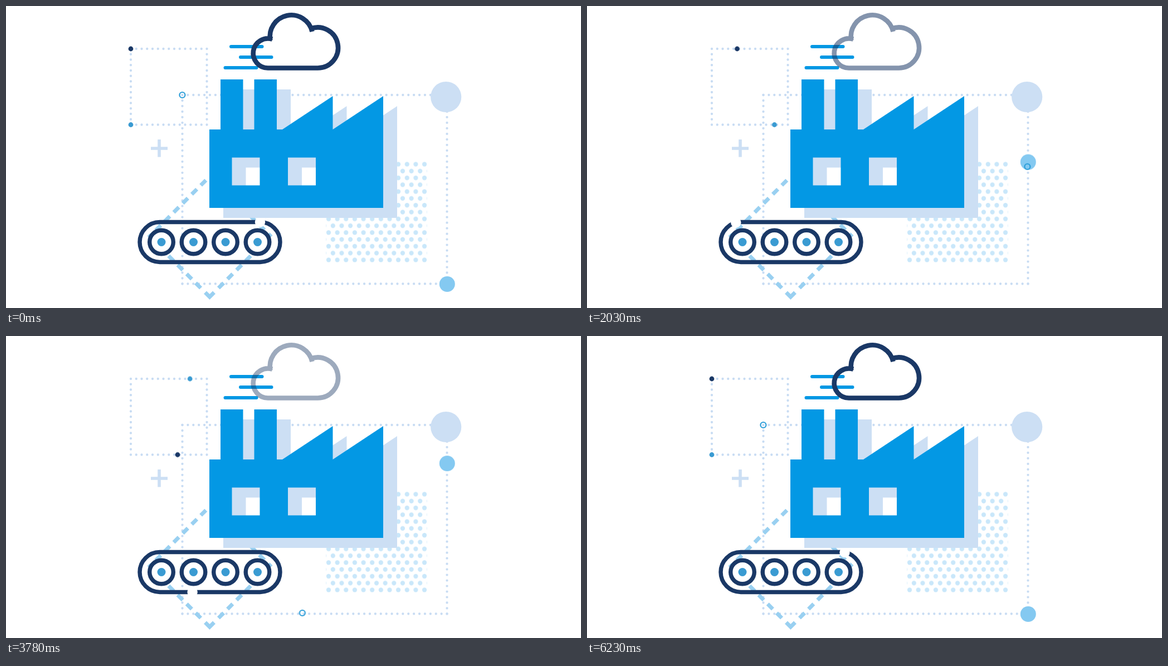
Write an HTML page that moves like this. It is 1032 px wide and 543 px high and loops after 6300 ms.

```html
<!DOCTYPE html>
<html lang="en">
<head>
<meta charset="utf-8">
<title>Factory</title>
<style>
  html, body { margin: 0; width: 100%; height: 100%; overflow: hidden; background: #fff; }
  svg { display: block; width: 100%; height: 100%; }

  .dotted { fill: none; stroke: #c8dcf3; stroke-width: 4.3; stroke-linecap: round; }
  .dashes { fill: none; stroke: #99d0f1; stroke-width: 7; }
  .navy { fill: none; stroke: #1a3866; }
  .pale { fill: #ccdff4; }
  .blue { fill: #0398e4; }
  .hub { fill: #3a9bd2; }

  /* The picture advances every 70 ms: 90 steps per loop. */
  .move { animation: 6300ms -1ms infinite steps(90); }
  .ring { animation-name: ring; }
  .dark { animation-name: dark; }
  .light { animation-name: light; }
  .lift { animation-name: lift; }
  .cloud { animation-name: fade; }
  .gap { animation-name: gap; }

  @keyframes ring {
    0% { transform: translate(0, 0); animation-timing-function: steps(21); }
    23.3333% { transform: translate(474px, 0); animation-timing-function: steps(21); }
    46.6667% { transform: translate(474px, 338px); animation-timing-function: steps(22); }
    71.1111% { transform: translate(0, 338px); animation-timing-function: steps(21); }
    94.4444%, 100% { transform: translate(0, 0); }
  }
  @keyframes dark {
    0%, 27.7778% { transform: translate(0, 0); animation-timing-function: steps(12); }
    41.1111% { transform: translate(136.5px, 0); animation-timing-function: steps(12); }
    54.4444% { transform: translate(136.5px, 136.5px); animation-timing-function: steps(13); }
    68.8889% { transform: translate(0, 136.5px); animation-timing-function: steps(13); }
    83.3333%, 100% { transform: translate(0, 0); }
  }
  @keyframes light {
    0%, 16.6667% { transform: translate(0, 0); animation-timing-function: steps(17); }
    35.5556% { transform: translate(136.5px, 0); animation-timing-function: steps(18); }
    55.5556% { transform: translate(136.5px, -136.5px); animation-timing-function: steps(18); }
    75.5556% { transform: translate(0, -136.5px); animation-timing-function: steps(17); }
    94.4444%, 100% { transform: translate(0, 0); }
  }
  @keyframes lift {
    0% { transform: translateY(0); animation-timing-function: steps(45); }
    50% { transform: translateY(-340.5px); animation-timing-function: steps(44); }
    98.8889%, 100% { transform: translateY(0); }
  }
  @keyframes fade {
    0% { opacity: 1; animation-timing-function: steps(45); }
    50% { opacity: .28; animation-timing-function: steps(44); }
    98.8889%, 100% { opacity: 1; }
  }
  @keyframes gap {
    from { stroke-dashoffset: 0; }
    to { stroke-dashoffset: -90; }
  }
</style>
</head>
<body>
<svg viewBox="0 0 1032 543" xmlns="http://www.w3.org/2000/svg">
  <defs>
    <path id="plant" fill-rule="evenodd" d="M365 222H385V132H425.5V222H445.5V132H486V222H496L586.5 162V222L677 162V363H365Z
      M405.5 272.5V322.5H455.5V272.5Z M506 272.5V322.5H556V272.5Z"/>
    <path id="belt" d="M456 388.5H276A36 36 0 0 0 276 460.5H456A36 36 0 0 0 456 388.5Z"/>
    <g id="wheel">
      <circle r="21.3" fill="#fff" stroke="#1a3866" stroke-width="7.4"/>
      <circle r="7.5" class="hub"/>
    </g>
    <pattern id="halftone" x="571.18" y="278.35" width="15.64" height="24.58" patternUnits="userSpaceOnUse">
      <g fill="#c9e7fa">
        <circle cx="7.82" cy="6.15" r="4.1"/>
        <circle cx="0" cy="18.44" r="4.1"/>
        <circle cx="15.64" cy="18.44" r="4.1"/>
      </g>
    </pattern>
  </defs>

  <path fill="url(#halftone)" d="M574.5 280H755.5V461H574.5Z"/>

  <path class="dotted" stroke-dasharray="0 9.75" d="M224 77H361M224 213.5H361M224 77V214M360.5 77V214"/>
  <path class="dotted" stroke-dasharray="0 9.896" d="M316.5 160H792M316.5 499.5H792"/>
  <path class="dotted" stroke-dasharray="0 9.985" d="M316.5 160V500M791.5 160V500"/>

  <path stroke="#ccdff4" stroke-width="5.6" d="M260 256H290M275 240V271.5"/>
  <circle class="pale" cx="789.7" cy="163.5" r="27.6"/>
  <circle class="move lift" cx="791.8" cy="500" r="14" fill="#84c9f1"/>
  <circle class="move ring" cx="316.4" cy="160" r="5" fill="none" stroke="#2a9dd8" stroke-width="2.2"/>
  <circle class="move light hub" cx="224" cy="213.5" r="4.4"/>
  <circle class="move dark" cx="224" cy="77" r="4.4" fill="#1a3866"/>

  <g class="dashes">
    <path d="M357.5 515L365.5 523L373.5 515"/>
    <path stroke-dasharray="13 9.9" d="M358.8 313.2L256 416M349.6 507.1L256 413.5M381.4 507.1L475 413.5M438.4 377.4L476 415"/>
  </g>

  <use href="#belt" class="navy" stroke-width="7.4"/>
  <path class="move gap" d="M456 388.5H276A36 36 0 0 0 276 460.5H456A36 36 0 0 0 456 388.5Z"
    pathLength="90" fill="none" stroke="#fff" stroke-width="18.4" stroke-linecap="round" stroke-dasharray="0 90"/>
  <use href="#wheel" x="279" y="424.5"/>
  <use href="#wheel" x="336.5" y="424.5"/>
  <use href="#wheel" x="394" y="424.5"/>
  <use href="#wheel" x="451.5" y="424.5"/>

  <use href="#plant" class="pale" x="25" y="18"/>
  <use href="#plant" class="blue"/>

  <path stroke="#0398e4" stroke-width="6" stroke-linecap="round" d="M404 73H459.5M421 92H476.5M393.5 111H449.5"/>
  <path class="move cloud navy" stroke-width="8.6" d="M546 41.1A36.5 36.5 0 1 1 559.5 111.5H470A26.5 26.5 0 1 1 478 59.7
    M474.4 62A38.4 38.4 0 0 1 549.5 46"/>
</svg>
</body>
</html>
```
